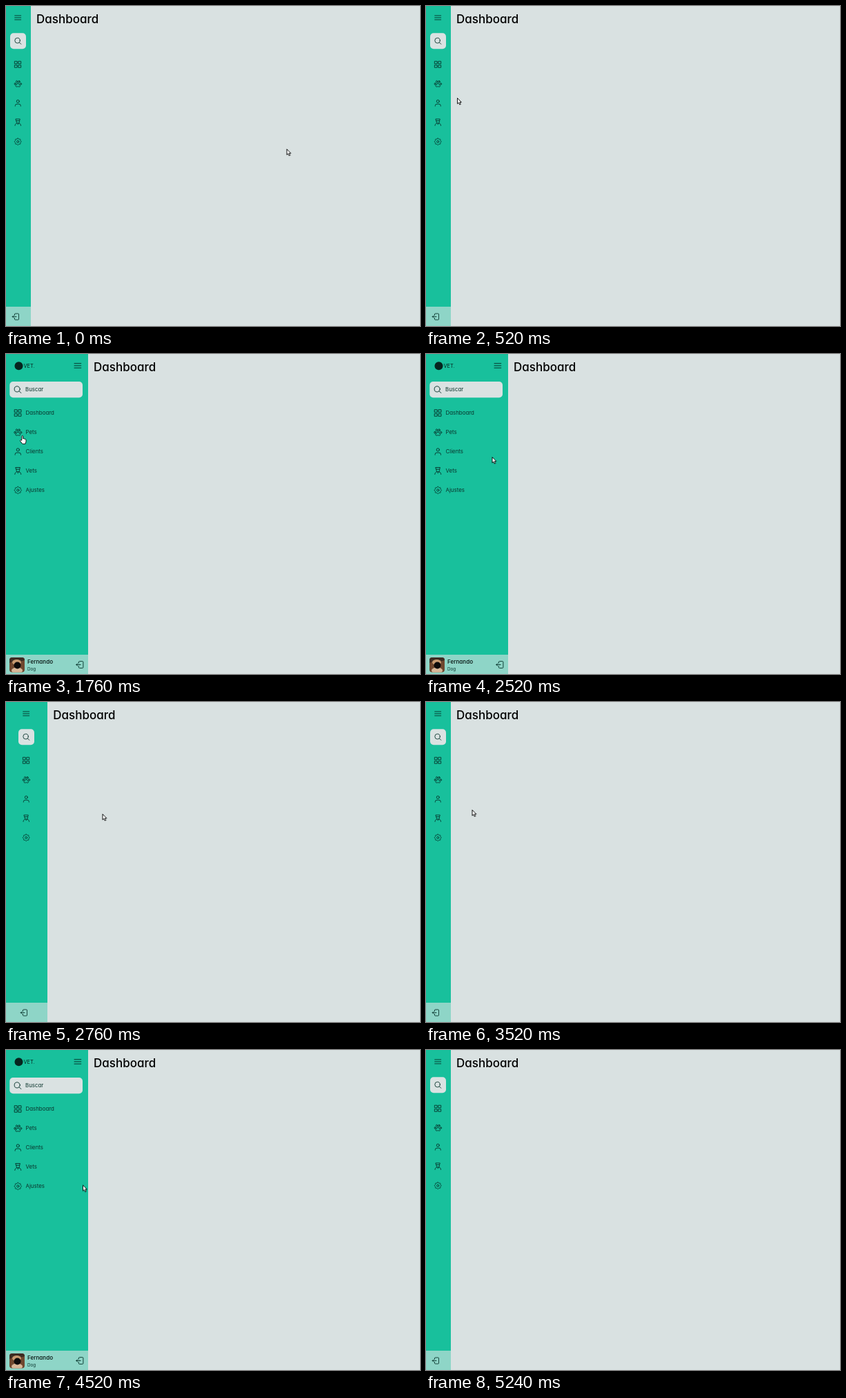
These frames come from a looping animation (600 px wide and 464 px high, 5.76 s). An HTML page:

```html
<!DOCTYPE html>
<html lang="es">
<head>
<meta charset="utf-8">
<title>Dashboard</title>
<style>
  html, body { margin: 0; width: 100%; height: 100%; overflow: hidden; background: #d9e1e1; }
  svg { display: block; }
  #stage { width: 600px; height: 464px; }
  text { font-family: Inter, "Open Sans", sans-serif; font-feature-settings: "cv11"; font-size: 7.9px; fill: #0b352d; }
  .title { font-size: 17px; font-weight: 500; fill: #000; }
  .name { font-size: 8.1px; font-weight: 500; fill: #06110f; }
  .small { font-size: 6.3px; }
  .logo { font-size: 7.4px; fill: #06251f; }
  .icons { fill: none; stroke: #07332b; stroke-width: 1.75; stroke-linecap: round; stroke-linejoin: round; }
  .field { fill: #dae2e2; stroke: none; }
  .pointer path { fill: #fff; stroke: #000; stroke-width: .9; stroke-linejoin: round; }

  .bar, .title, .narrow, .wide, .pointer, .arrow, .hand { animation: 5760ms step-end infinite; }
  .bar { animation-name: bar; }
  .title { animation-name: title; }
  .narrow { animation-name: narrow; }
  .wide { animation-name: wide; }
  .pointer { animation-name: pointer; }
  .arrow { animation-name: arrow; }
  .hand { animation-name: hand; }

  @keyframes bar {
    0%, 52.083%, 82.638% { width: 36px; }
    13.194%, 65.277% { width: 119px; }
    47.916% { width: 60px; }
  }
  @keyframes title {
    0%, 52.083%, 82.638% { transform: translateX(36px); }
    13.194%, 65.277% { transform: translateX(119px); }
    47.916% { transform: translateX(60.3px); }
  }
  @keyframes narrow {
    0%, 52.083%, 82.638% { visibility: visible; transform: none; }
    13.194%, 65.277% { visibility: hidden; transform: none; }
    47.916% { visibility: visible; transform: translateX(12px); }
  }
  @keyframes wide {
    0%, 47.916%, 82.638% { visibility: hidden; }
    13.194%, 65.277% { visibility: visible; }
  }
  @keyframes pointer {
    0% { transform: translate(406.5px, 207px); opacity: 1; }
    4.166% { transform: translate(219px, 190px); }
    9.027% { transform: translate(45px, 133px); }
    13.194% { transform: translate(20px, 114px); }
    17.361% { transform: translate(18px, 113px); }
    21.527% { transform: translate(16px, 112px); }
    26.388% { transform: translate(18px, 113px); }
    30.555% { transform: translate(20px, 118px); }
    34.722% { transform: translate(22.5px, 119.5px); }
    38.888% { transform: translate(40px, 129px); }
    43.75% { transform: translate(95.5px, 149px); }
    47.916% { transform: translate(139.5px, 162px); }
    52.083% { transform: translate(160px, 167px); }
    56.25% { transform: translate(160px, 168px); }
    61.111% { transform: translate(66.5px, 156px); }
    65.277% { transform: translate(24px, 159px); }
    69.444% { transform: translate(26px, 159px); }
    73.611% { transform: translate(31px, 158px); }
    78.472% { transform: translate(111px, 195.5px); }
    82.638% { transform: translate(205px, 168px); }
    86.805% { transform: translate(525.5px, 67px); opacity: 1; }
    90.972%, 100% { transform: translate(525.5px, 67px); opacity: 0; }
  }
  @keyframes arrow {
    0%, 38.888%, 78.472% { visibility: visible; }
    13.194%, 65.277% { visibility: hidden; }
  }
  @keyframes hand {
    0%, 38.888%, 78.472% { visibility: hidden; }
    13.194%, 65.277% { visibility: visible; }
  }
</style>
</head>
<body>
<svg id="stage" viewBox="0 0 600 464">
  <defs>
    <symbol id="menu" viewBox="0 0 24 24"><path d="M3 6h18M3 12h18M3 18h18"/></symbol>
    <symbol id="search" viewBox="0 0 24 24"><circle cx="10.5" cy="10.5" r="7.5"/><path d="M21 21l-5.2-5.2"/></symbol>
    <symbol id="grid" viewBox="0 0 24 24"><path d="M3 3h7v7H3zM14 3h7v7h-7zM3 14h7v7H3zM14 14h7v7h-7z"/></symbol>
    <symbol id="paw" viewBox="0 0 24 24">
      <path d="M12 11c-3 0-3 4-5.200 5.200C5 17.500 5.500 21 8 21c1.500 0 2.500-1 4-1s2.500 1 4 1c2.500 0 3-3.500 1.200-4.800C15 15 15 11 12 11z"/>
      <ellipse cx="3.800" cy="12.500" rx="2.300" ry="2.700"/><ellipse cx="20.200" cy="12.500" rx="2.300" ry="2.700"/>
      <ellipse cx="8.600" cy="6" rx="2.300" ry="2.900"/><ellipse cx="15.400" cy="6" rx="2.300" ry="2.900"/>
    </symbol>
    <symbol id="user" viewBox="0 0 24 24"><circle cx="12" cy="7" r="4"/><path d="M4 21v-1a5 5 0 0 1 5-5h6a5 5 0 0 1 5 5v1"/></symbol>
    <symbol id="vet" viewBox="0 0 24 24">
      <path d="M6 2.500h12l-1.500 5h-9zM7.500 7.500V10a4.500 4.500 0 0 0 9 0V7.500M3.500 21.500c0-4 2.500-6 5-7l3.500 3.500 3.500-3.500c2.500 1 5 3 5 7"/>
    </symbol>
    <symbol id="gear" viewBox="0 0 24 24"><path id="cog"/><circle cx="12" cy="12" r="3"/></symbol>
    <symbol id="exit" viewBox="0 0 24 24">
      <path d="M9 8V5a2 2 0 0 1 2-2h8a2 2 0 0 1 2 2v14a2 2 0 0 1-2 2h-8a2 2 0 0 1-2-2v-3M14 12H2.500M6 8.500L2.500 12 6 15.500"/>
    </symbol>
    <clipPath id="frame"><rect x="5" y="440" width="22" height="21.500" rx="4"/></clipPath>
  </defs>

  <rect width="600" height="464" fill="#d9e1e1"/>
  <rect class="bar" width="36" height="464" fill="#18c09c"/>
  <rect class="bar" y="436" width="36" height="28" fill="#8ed5c7"/>
  <text class="title" x="8" y="25.200">Dashboard</text>

  <g class="narrow icons">
    <rect class="field" x="6" y="39.300" width="23" height="23" rx="5"/>
    <use href="#menu" x="11.200" y="10.900" width="12" height="12"/>
    <use href="#search" x="11.300" y="44.800" width="12" height="12"/>
    <use href="#grid" x="11.200" y="78.700" width="12" height="12"/>
    <use href="#paw" x="11.300" y="106.700" width="12" height="12"/>
    <use href="#user" x="11.300" y="134.700" width="12" height="12"/>
    <use href="#vet" x="11.300" y="162.700" width="12" height="12"/>
    <use href="#gear" x="11.200" y="190.700" width="12" height="12"/>
    <use href="#exit" x="8" y="444.500" width="12" height="12"/>
  </g>

  <g class="wide">
    <circle cx="18.500" cy="17.300" r="6" fill="#06251f"/>
    <text class="logo" x="25.500" y="19.900">VET.</text>
    <g class="icons">
      <rect class="field" x="5.300" y="40" width="105.700" height="23.300" rx="5"/>
      <use href="#menu" x="97.400" y="10.400" width="13" height="13"/>
      <use href="#search" x="10.500" y="45.200" width="13" height="13"/>
      <use href="#grid" x="11" y="79.200" width="12.600" height="12.600"/>
      <use href="#paw" x="11" y="107.200" width="12.600" height="12.600"/>
      <use href="#user" x="11" y="135.200" width="12.600" height="12.600"/>
      <use href="#vet" x="11" y="163.200" width="12.600" height="12.600"/>
      <use href="#gear" x="11" y="191.200" width="12.600" height="12.600"/>
      <use href="#exit" x="100.500" y="444" width="13" height="13"/>
    </g>
    <text x="28" y="54.300">Buscar</text>
    <text x="28.500" y="88.200">Dashboard</text>
    <text x="28.500" y="116.200">Pets</text>
    <text x="28.500" y="144.200">Clients</text>
    <text x="28.500" y="172.200">Vets</text>
    <text x="28.500" y="200.200">Ajustes</text>
    <g clip-path="url(#frame)">
      <rect x="5" y="440" width="22" height="22" fill="#70482f"/>
      <path d="M5 440h22v4l-6 2-9-1-7 3z" fill="#3c2b22"/>
      <ellipse cx="15.500" cy="447" rx="6.500" ry="4" fill="#c79a70"/>
      <ellipse cx="16" cy="459" rx="8" ry="4.500" fill="#d8b798"/>
      <circle cx="16.500" cy="451.500" r="5" fill="#0d0b0b"/>
    </g>
    <text class="name" x="31" y="448.600">Fernando</text>
    <text class="small" x="31" y="459">Dog</text>
  </g>

  <g class="pointer">
    <path class="arrow" d="M.5.500v8.300l1.900-1.700 1.400 3 1.500-.7-1.400-2.900h2.400z"/>
    <path class="hand" d="M2.800 7.300V1.600a1 1 0 0 1 2 0v3.300q1-.7 1.600.2 1-.4 1.400.4 1.200-.1 1.200 1.200v2.500L8 12.300H3.800L.8 8.500Q.2 7 1.400 6.700z"/>
  </g>
</svg>
<script>
  // Eight-lobed cog outline
  const points = Array.from({ length: 96 }, (_, i) => {
    const a = i / 96 * 2 * Math.PI;
    const r = 8.8 + Math.cos(8 * a);
    return (12 + r * Math.sin(a)).toFixed(2) + " " + (12 - r * Math.cos(a)).toFixed(2);
  });
  document.getElementById("cog").setAttribute("d", "M" + points.join("L") + "Z");
</script>
</body>
</html>
```
